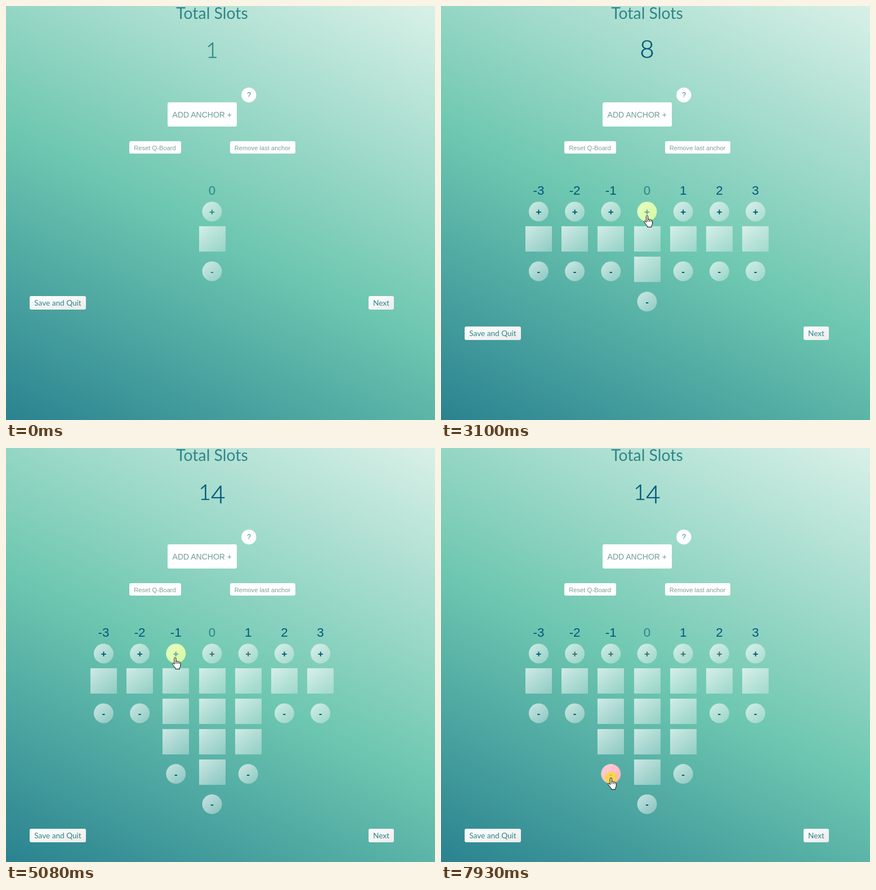
Recreate the animation shown at these times as an HTML page. Size 762x735 px, loop 7990 ms.

```html
<!DOCTYPE html>
<html lang="en">
<head>
<meta charset="utf-8">
<title>Board builder</title>
<style>
  html, body { margin: 0; width: 100%; height: 100%; overflow: hidden; }
  svg { display: block; width: 762px; height: 735px; }
  text { text-anchor: middle; font-family: "Liberation Sans", Arial, sans-serif; }
  .lato { font-family: Lato, sans-serif; }
  .total { font-weight: 300; stroke-width: .5px; }
  .sign { font-size: 17px; font-weight: bold; }
  .label { font-size: 22.4px; }
  .small { font-size: 11.2px; fill: #7e9f99; }
  .nav { font-size: 13.6px; fill: #2d8589; }
</style>
</head>
<body>
<svg viewBox="0 0 762 735">
  <defs>
    <linearGradient id="page" gradientUnits="userSpaceOnUse" x1="762" y1="0" x2="315" y2="894">
      <stop offset="0" stop-color="#d9f0e8"/>
      <stop offset=".535" stop-color="#6dc7b0"/>
      <stop offset="1" stop-color="#2a8290"/>
    </linearGradient>
    <linearGradient id="glass" x2="1" y2="1">
      <stop offset="0" stop-color="#fff" stop-opacity=".7"/>
      <stop offset="1" stop-color="#e8f2f2" stop-opacity=".36"/>
    </linearGradient>
    <linearGradient id="lime" x2="1" y2="1">
      <stop offset="0" stop-color="#eaffc4"/>
      <stop offset="1" stop-color="#d2f89f"/>
    </linearGradient>
    <linearGradient id="pink" x2="1" y2="1">
      <stop offset="0" stop-color="#ffd0d6"/>
      <stop offset="1" stop-color="#ffb0ba"/>
    </linearGradient>
    <linearGradient id="nav" x2="1" y2="1">
      <stop offset="0" stop-color="#fff"/>
      <stop offset="1" stop-color="#ebebeb"/>
    </linearGradient>
  </defs>
  <rect width="762" height="735" fill="url(#page)"/>
  <text class="lato" x="366" y="23" font-size="28.4" fill="#2d8589">Total Slots</text>
  <circle cx="431.3" cy="158" r="13.2" fill="#fff"/>
  <text x="431.5" y="162.3" font-size="12" fill="#2d8589">?</text>
  <rect x="219" y="240" width="92" height="22" rx="3" fill="#fff"/>
  <text class="small" x="264.5" y="256">Reset Q-Board</text>
  <rect x="398" y="240" width="116" height="22" rx="3" fill="#fff"/>
  <text class="small" x="455.5" y="256">Remove last anchor</text>
  <g id="live"></g>
</svg>
<script>
const STEP = 66, LOOP = 7990;
const PITCH = 64.2, ROW = 53.8, R = 17.5;
const NAVY = '#00577a', TEAL = '#2d8589', GREY = '#45666b', SOFT = '#6f9b98';

// The pointer's tour of the controls; times count steps of STEP ms.
const entry = { x: 574, y: 641, leave: 1 };
const visits = [
  { kind: 'add', arrive: 10, clicks: [12, 17, 30], leave: 35 },
  { kind: '+', col: 0, arrive: 42, clicks: [45, 50, 54] },
  { kind: '+', col: -1, arrive: 58, clicks: [61, 65] },
  { kind: '+', col: 1, arrive: 70, clicks: [72, 74] },
  { kind: '+', col: -2, arrive: 81, clicks: [83] },
  { kind: '+', col: 2, arrive: 91, clicks: [92] },
  { kind: '-', col: 2, arrive: 99, clicks: [104] },
  { kind: '-', col: -2, arrive: 108, clicks: [113] },
  { kind: '-', col: -1, arrive: 119, clicks: [121] }
];

const HAND = 'M-1.5 1.5a1.5 1.5 0 0 1 3 0V7c.4-1 2.7-.8 3 .6c.5-.9 2.5-.6 2.7.8' +
  'c.6-.6 2.3-.3 2.3 1.2V14c0 2-1.5 3-1.5 5v1.5H.5V19C-.5 17-3.2 14.5-5 11.5' +
  'c-.8-1.6 1.2-2.7 2.3-1.2L-1.5 12Z M1.5 7v4M4.5 8v3M7.2 9v2';
const ARROW = 'M0 0V16l3.7-3.5 2.4 5.6 2.5-1-2.4-5.5H11.3Z';

const live = document.getElementById('live');
const colX = c => 366 + c * PITCH;
const minusY = n => 471 + (n - 1) * ROW;

// Clicks made by step k on one kind of control.
const clicked = (k, kind, col) => visits
  .filter(v => v.kind === kind && v.col === col)
  .flatMap(v => v.clicks).filter(at => at <= k).length;

const slots = (k, c) => 1 + clicked(k, '+', c) - clicked(k, '-', c);

function columnsAt(k) {
  const reach = clicked(k, 'add');
  return Array.from({ length: 2 * reach + 1 }, (_, i) => {
    const c = i - reach;
    return { c, n: slots(k, c), x: colX(c) };
  });
}

for (const v of visits) {
  v.leave ??= v.clicks.at(-1);
  v.x = v.kind === 'add' ? 343 : colX(v.col);
  v.y = v.kind === 'add' ? 199 : 7 + (v.kind === '+' ? 365 : minusY(slots(v.arrive, v.col)));
}

function cursorAt(k) {
  if (k < entry.leave) return null;
  const i = visits.findIndex(v => v.leave >= k);
  const to = visits[i], from = visits[i - 1] || entry;
  const f = Math.min(1, (k - from.leave) / (to.arrive - from.leave));
  const e = 1 - (1 - f) ** 2;
  return { x: from.x + (to.x - from.x) * e, y: from.y + (to.y - from.y) * e };
}

// Name of the control under the pointer, or ''.
function hit(k) {
  const p = cursorAt(k);
  if (!p) return '';
  if (p.x > 287 && p.x < 410 && p.y > 171 && p.y < 214) return 'add';
  for (const { c, n, x } of columnsAt(k)) {
    if (Math.hypot(p.x - x, p.y - 365) < R) return '+' + c;
    if (Math.hypot(p.x - x, p.y - minusY(n)) < R) return '-' + c;
    if (Math.abs(p.x - x) < 23.5 && p.y > 391 && p.y < 391 + n * ROW) return 'slot';
  }
  return '';
}

const text = (x, y, s, cls, fill = '') =>
  `<text x="${x}" y="${y}" class="${cls}" fill="${fill}">${s}</text>`;

const round = (x, y, sign, paint, fill) =>
  `<circle cx="${x}" cy="${y}" r="${R}" fill="url(#${paint})"/>` + text(x, y + 6, sign, 'sign', fill);

const nav = (x, y, w, s) =>
  `<rect x="${x}" y="${y}" width="${w}" height="24" rx="3" fill="url(#nav)"/>` +
  text(x + w / 2, y + 16.5, s, 'nav lato');

// Old-style figures: short 0 1 2, descending 3 4 5 7 9.
function total(n) {
  const color = n > 1 ? NAVY : TEAL;
  let drop = 0, out = '';
  for (const d of String(n)) {
    const next = '34579'.includes(d) ? 6 : 0;
    const size = '012'.includes(d) ? 37 : 44;
    out += `<tspan dy="${next - drop}" font-size="${size}" stroke="${color}">${d}</tspan>`;
    drop = next;
  }
  return text(366, 92, out, 'total lato', color);
}

function column({ c, n, x }, k, hot) {
  const plusHot = hot('+' + c), minusHot = hot('-' + c);
  const ink = c === 0 && n === 1 ? TEAL : NAVY;
  const plusInk = plusHot ? SOFT : clicked(k, '+', c) ? GREY : ink;
  let out = text(x, 335, c, 'label', c ? NAVY : TEAL);
  out += round(x, 365, '+', plusHot ? 'lime' : 'glass', plusInk);
  for (let i = 0; i < n; i++) {
    const left = Math.round(x - 23.5), top = Math.round(391.3 + i * ROW);
    out += `<rect x="${left}" y="${top}" width="47" height="45" fill="url(#glass)"/>`;
  }
  return out + round(x, minusY(n), '-', minusHot ? 'pink' : 'glass', minusHot ? SOFT : ink);
}

function pointer(k) {
  const p = cursorAt(k);
  if (!p) return '';
  const pressed = visits.some(v => v.clicks.includes(k + 1));
  const ripple = pressed
    ? `<circle cx="${p.x}" cy="${p.y}" r="10.7" fill="#ffe100" fill-opacity=".6"/>` : '';
  return ripple + `<path transform="translate(${p.x} ${p.y})" d="${hit(k) ? HAND : ARROW}"
    fill="#fff" stroke="#000" stroke-linejoin="round"/>`;
}

function draw(k) {
  const cols = columnsAt(k), now = hit(k), before = hit(k - 1);
  const hot = name => now === name || before === name;
  const deepest = Math.max(...cols.map(c => c.n));
  const navY = Math.round(515 + (deepest - 1) * ROW);
  const add = now === 'add';
  live.innerHTML = total(cols.reduce((s, c) => s + c.n, 0)) +
    `<rect x="287" y="171" width="123" height="43" rx="3" fill="${add ? NAVY : '#fff'}"/>` +
    `<text x="348.3" y="198" font-size="14" fill="${add ? '#fff' : SOFT}">ADD ANCHOR +</text>` +
    cols.map(c => column(c, k, hot)).join('') +
    nav(42, navY, 100, 'Save and Quit') + nav(644, navY, 45, 'Next') + pointer(k);
}

const start = performance.now();
let shown = -1;
function tick() {
  const t = (performance.now() - start) % LOOP;
  const k = Math.min(120, Math.floor((t + 4) / STEP));
  if (k !== shown) draw(shown = k);
  requestAnimationFrame(tick);
}
tick();
</script>
</body>
</html>
```
